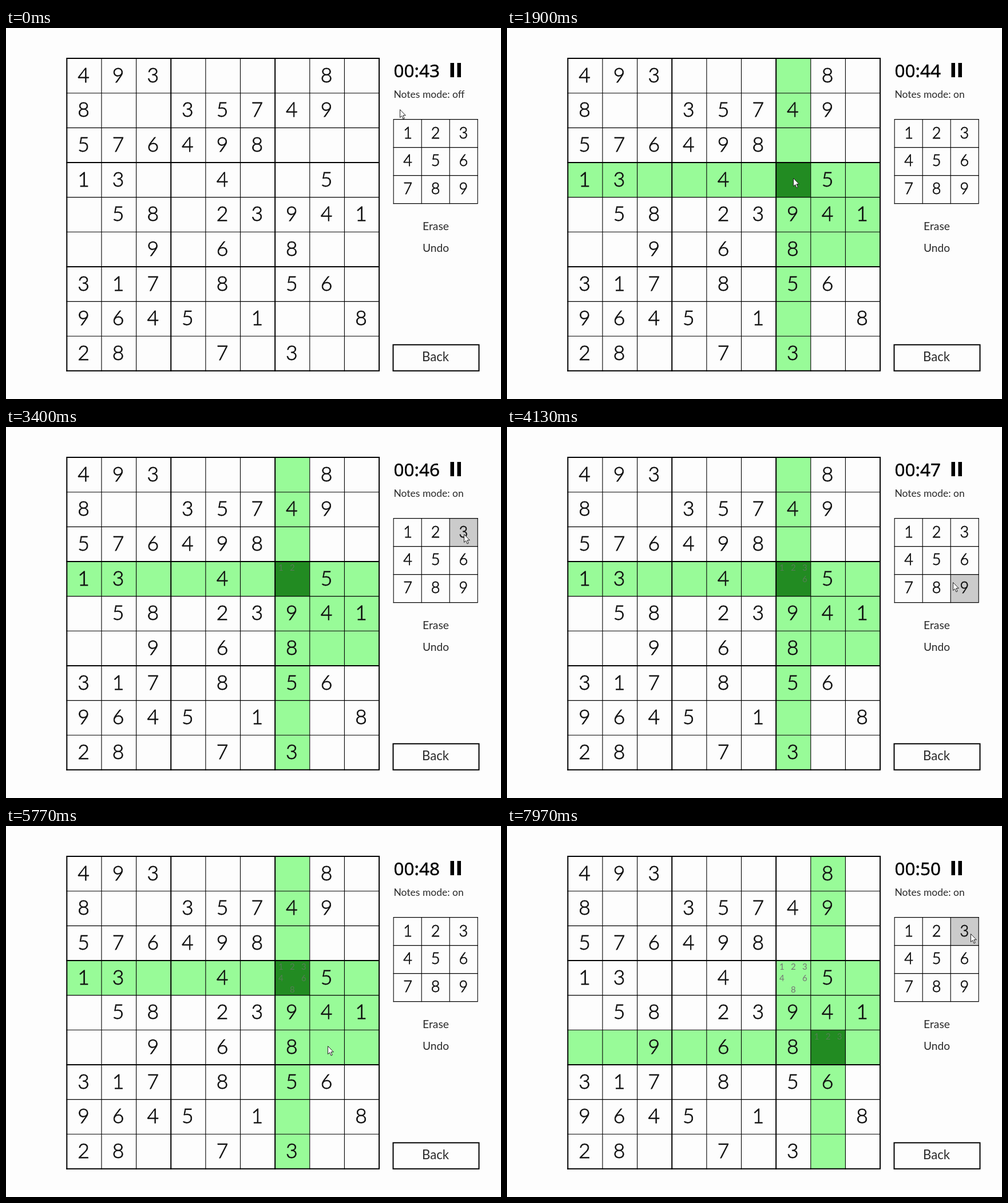
Recreate the animation shown at these times as an HTML page. Size 865 px wide and 648 px high, loop 8 s.

```html
<!DOCTYPE html>
<html lang="en">
<head>
<meta charset="utf-8">
<title>Sudoku</title>
<style>
  html, body { margin: 0; width: 100%; height: 100%; overflow: hidden; background: #fdfdfd; }
  svg { display: block; width: 865px; height: 648px; }
  text { font-family: Lato, "Open Sans", sans-serif; fill: #2a2a2a; }
  .digit { font-weight: 300; text-anchor: middle; fill: #111; stroke: #111; stroke-width: .8px; }
  .note { font-size: 15px; text-anchor: middle; fill: #757575; }
  .label { text-anchor: middle; }
  .clock { font: 31.5px "Noto Sans", "Open Sans", sans-serif; fill: #000; stroke: #000; stroke-width: .4px; }
</style>
</head>
<body>
<svg id="stage" viewBox="0 0 865 648"></svg>
<script>
const LOOP = 8000;
const BOARD = { x: 106.3, y: 53.1, step: 60.64 };
const PAD = { x: 677.2, y: 159.6, step: 49 };
const GIVEN = [
  '493....8.', '8..35749.', '576498...',
  '13..4..5.', '.58.23941', '..9.6.8..',
  '317.8.56.', '9645.1..8', '28..7.3..'
];

// cursor stops: time, x, y, optional pause
const PATH = [
  [0, 688, 142], [380, 722, 120, 220], [1230, 610, 172], [1650, 500, 262, 250],
  [2560, 711, 186, 200], [3020, 752, 186, 130], [3380, 800, 187, 140],
  [3760, 800, 234, 140], [4130, 779, 271], [4260, 755, 281, 160],
  [4720, 703, 236, 140], [5130, 679, 301], [5650, 562, 384, 250],
  [6600, 699, 209], [6740, 703, 188, 160], [7190, 751, 190, 160], [7680, 810, 188, 320]
].flatMap(([t, x, y, hold]) => hold ? [[t, x, y], [t + hold, x, y]] : [[t, x, y]]);

const NOTES_ON = 500;
const START_SECOND = 43;
const FIRST_TICK = 990;
const PICKS = [
  { t: 1780, row: 3, col: 6, notes: [[2640, 1], [3080, 2], [3450, 3], [3830, 6], [4340, 8], [4790, 4]] },
  { t: 5780, row: 5, col: 7, notes: [[6820, 1], [7270, 2], [7800, 3]] }
];

const stage = document.getElementById('stage');

function add(tag, attrs, text) {
  const node = document.createElementNS('http://www.w3.org/2000/svg', tag);
  for (const key in attrs) node.setAttribute(key, attrs[key]);
  if (text !== undefined) node.textContent = text;
  stage.appendChild(node);
  return node;
}

function addCells(grid, count) {
  return Array.from({ length: count * count }, (_, i) => add('rect', {
    x: grid.x + (i % count) * grid.step,
    y: grid.y + Math.floor(i / count) * grid.step,
    width: grid.step, height: grid.step, fill: 'none'
  }));
}

function addLines(grid, count, widthOf) {
  const cap = widthOf(0) / 2;
  const length = count * grid.step + 2 * cap;
  for (let i = 0; i <= count; i++) {
    const offset = i * grid.step;
    add('path', {
      d: `M${grid.x + offset} ${grid.y - cap}v${length}M${grid.x - cap} ${grid.y + offset}h${length}`,
      stroke: '#000', 'stroke-width': widthOf(i)
    });
  }
}

const cells = addCells(BOARD, 9);
const keys = addCells(PAD, 3);
addLines(BOARD, 9, i => i % 3 ? 1.1 : 2);
addLines(PAD, 3, () => 1.1);

GIVEN.forEach((line, row) => [...line].forEach((n, col) => {
  if (n === '.') return;
  add('text', {
    class: 'digit', 'font-size': 35.5,
    x: 135.5 + col * BOARD.step, y: 94.8 + row * BOARD.step
  }, n);
}));
for (let i = 0; i < 9; i++) {
  add('text', {
    class: 'digit', 'font-size': 27,
    x: 702 + (i % 3) * 48.7, y: 192.5 + Math.floor(i / 3) * 48.8
  }, i + 1);
}

const notes = PICKS.flatMap(pick => pick.notes.map(([t, n]) => ({
  t, pick,
  node: add('text', {
    class: 'note',
    x: BOARD.x + pick.col * BOARD.step + 10.3 + (n - 1) % 3 * 20,
    y: BOARD.y + pick.row * BOARD.step + 16.3 + Math.floor((n - 1) / 3) * 20
  }, n)
})));

const clock = add('text', { class: 'clock', x: 677.5, y: 86 });
for (const x of [776.5, 788.5]) add('rect', { x, y: 61, width: 6.5, height: 25, fill: '#000' });
const mode = add('text', { x: 677.5, y: 121.5, 'font-size': 17.5 });
add('text', { class: 'label', x: 751, y: 353, 'font-size': 19.3 }, 'Erase');
add('text', { class: 'label', x: 751, y: 391, 'font-size': 19.2 }, 'Undo');
add('rect', { x: 676.5, y: 553.3, width: 150, height: 45.5, fill: 'none', stroke: '#000', 'stroke-width': 2 });
add('text', { class: 'label', x: 750.5, y: 582.3, 'font-size': 22.2 }, 'Back');
const cursor = add('path', {
  d: 'M.5 .5V14.5L3.7 11.5L6 17L8.2 16L5.9 10.7H10.3Z',
  fill: '#fff', stroke: '#222', 'stroke-width': 1
});

// monotone cubic tangent: zero at pauses and turns
function slope(i, axis) {
  if (i === 0 || i === PATH.length - 1) return 0;
  const [a, b, c] = [PATH[i - 1], PATH[i], PATH[i + 1]];
  const before = (b[axis] - a[axis]) / (b[0] - a[0]);
  const after = (c[axis] - b[axis]) / (c[0] - b[0]);
  return before * after > 0 ? 2 * before * after / (before + after) : 0;
}

function cursorAt(t) {
  let i = PATH.findIndex(p => p[0] > t) - 1;
  if (i < 0) i = PATH.length - 2;
  const a = PATH[i], b = PATH[i + 1];
  const span = b[0] - a[0];
  const u = (t - a[0]) / span;
  const ease = u * u * (3 - 2 * u);
  return [1, 2].map(axis => a[axis] + (b[axis] - a[axis]) * ease
    + span * u * (1 - u) * ((1 - u) * slope(i, axis) - u * slope(i + 1, axis)));
}

function cellFill(row, col, pick) {
  if (!pick) return 'none';
  if (row === pick.row && col === pick.col) return '#228b22';
  const third = n => Math.floor(n / 3);
  const sameBox = third(row) === third(pick.row) && third(col) === third(pick.col);
  return row === pick.row || col === pick.col || sameBox ? '#98fb98' : 'none';
}

function draw(t) {
  const [x, y] = cursorAt(t);
  const pick = PICKS.filter(p => p.t <= t).pop();
  const col = Math.floor((x - PAD.x) / PAD.step);
  const row = Math.floor((y - PAD.y) / PAD.step);
  const hover = col >= 0 && col < 3 && row >= 0 && row < 3 ? row * 3 + col : -1;
  const ticks = Math.max(0, Math.floor((t - FIRST_TICK) / 1000) + 1);

  cells.forEach((cell, i) => cell.setAttribute('fill', cellFill(Math.floor(i / 9), i % 9, pick)));
  keys.forEach((key, i) => key.setAttribute('fill', i === hover ? '#cbcbcb' : 'none'));
  notes.forEach(note => note.node.setAttribute('opacity', t < note.t ? 0 : note.pick === pick ? .6 : 1));
  clock.textContent = '00:' + (START_SECOND + ticks);
  mode.textContent = 'Notes mode: ' + (t < NOTES_ON ? 'off' : 'on');
  cursor.setAttribute('transform', `translate(${Math.round(x)} ${Math.round(y)})`);
}

const start = performance.now();
function frame() {
  draw((performance.now() - start) % LOOP);
  requestAnimationFrame(frame);
}
frame();
</script>
</body>
</html>
```
